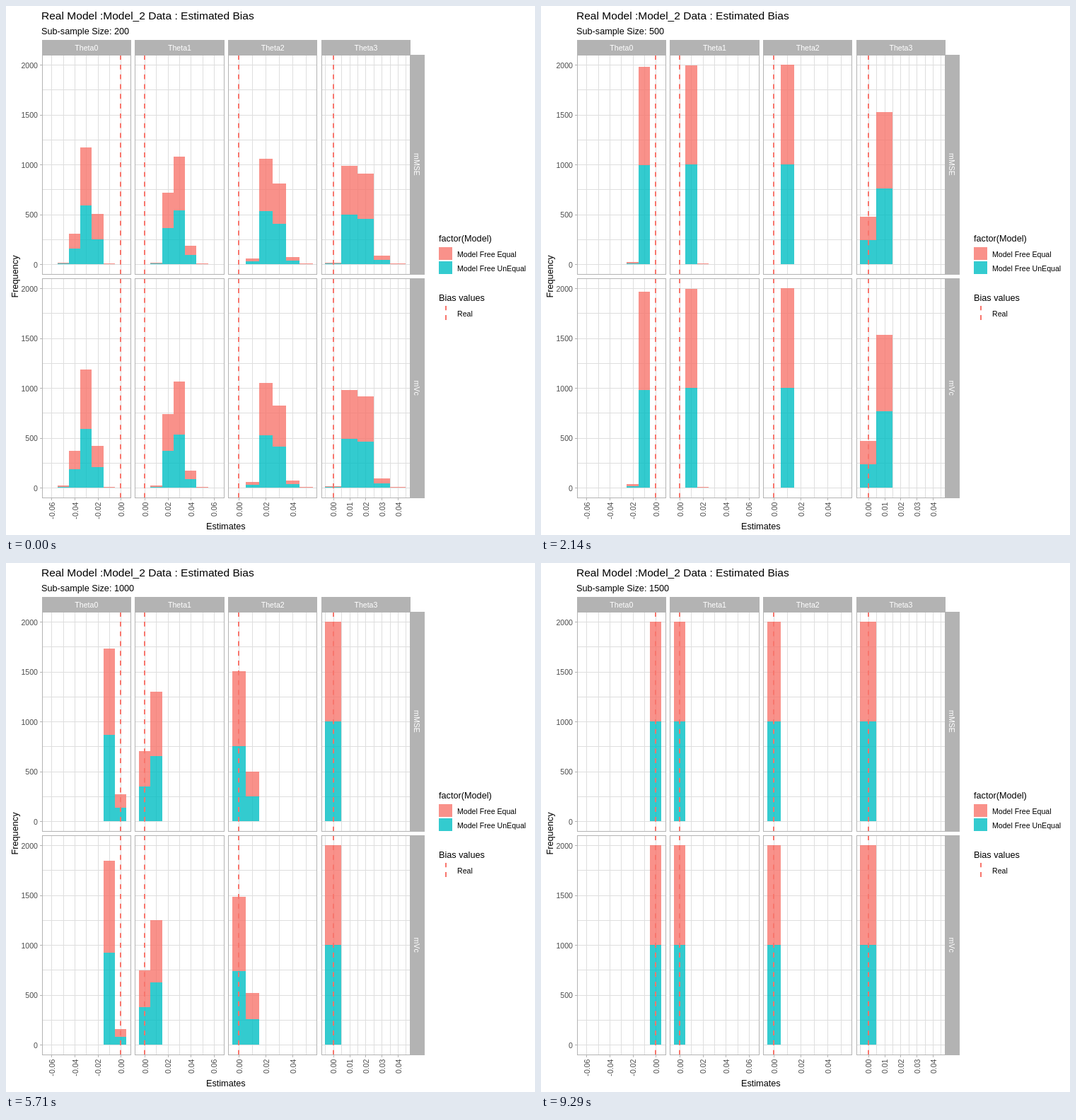
An HTML page with a canvas for the animation above (10000 ms loop, 748x748 px).

```html
<!DOCTYPE html>
<html lang="en">
<head>
<meta charset="utf-8">
<title>Estimated Bias</title>
<style>
  html, body { margin: 0; width: 100%; height: 100%; overflow: hidden; background: #fff; }
  canvas { display: block; width: 748px; height: 748px; }
</style>
</head>
<body>
<canvas id="stage" width="748" height="748"></canvas>
<script>
const ctx = document.getElementById('stage').getContext('2d');
const snap = Math.floor;
const LOOP = 10000, STEPS = 14;
const SALMON = '#F8766D', TEAL = '#00BFC4', GREY = '#B3B3B3', GRID = '#DEDEDE', AXIS = '#4D4D4D';
const SMALL = 10.6, MEDIUM = 12.7, LARGE = 15.55;
const PANEL_W = 125.5, PANEL_GAP = 6.2;

// Facet columns, in bins of 0.01. The square root of the bias is normal;
// mean (one per row) and spread are given for a sub-sample of 200.
const columns = [
  { first: -6, last: 0, sign: -1, label: 2, grid: 1, mean: [1.697, 1.722], spread: 0.175 },
  { first: 0, last: 6, sign: 1, label: 2, grid: 1, mean: [1.64, 1.635], spread: 0.175 },
  { first: 0, last: 5, sign: 1, label: 2, grid: 1, mean: [1.555, 1.558], spread: 0.175 },
  { first: 0, last: 4, sign: 1, label: 1, grid: 0.5, mean: [1.225, 1.227], spread: 0.21 }
].map((c, i) => {
  const left = 51.05 + i * (PANEL_W + PANEL_GAP);
  const bins = c.last - c.first + 1;
  const step = PANEL_W / 1.1 / bins;
  const x = bin => left + PANEL_W / 22 + (bin - c.first + 0.5) * step;
  return { ...c, bins, name: 'Theta' + i, left, right: left + PANEL_W, x };
});
const rows = [
  { name: 'mMSE', top: 69.4, bottom: 379.6, zero: 365.5 },
  { name: 'mVc', top: 385.5, bottom: 695.7, zero: 681.6 }
].map(r => ({ ...r, y: count => r.zero - count * 0.141 }));

const normalCdf = z => 1 / (1 + Math.exp(-1.5976 * z - 0.07056 * z ** 3));

// Expected counts per bin, moving away from zero.
function histogram(col, r, size) {
  const mean = col.mean[r] * (200 / size) ** 0.511;
  const spread = col.spread * 200 / size;
  const below = edge => edge < 0 ? 0 : normalCdf((Math.sqrt(edge) - mean) / spread);
  return Array.from({ length: col.bins },
    (_, k) => Math.round(2000 * (below(k + 0.5) - below(k - 0.5))));
}

function fill(x0, y0, x1, y1, color) {
  ctx.fillStyle = color;
  ctx.fillRect(x0, y0, x1 - x0, y1 - y0);
}
const hLine = (x0, x1, y, color) => fill(x0, snap(y), x1, snap(y) + 1, color);
const vLine = (x, y0, y1, color) => fill(snap(x), y0, snap(x) + 1, y1, color);

function text(str, x, y, size, color = '#000', align = 'left', turn = 0) {
  ctx.save();
  ctx.translate(x, y);
  ctx.rotate(turn * Math.PI / 2);
  ctx.font = `${size}px "Liberation Sans", Arial, sans-serif`;
  ctx.textAlign = align;
  ctx.fillStyle = color;
  ctx.fillText(str, 0, 0);
  ctx.restore();
}

function dashes(x, bottom, top) {
  ctx.save();
  ctx.strokeStyle = SALMON;
  ctx.lineWidth = 2;
  ctx.setLineDash([6.9, 6.9]);
  ctx.beginPath();
  ctx.moveTo(snap(x), bottom);
  ctx.lineTo(snap(x), top);
  ctx.stroke();
  ctx.restore();
}

function gridLines(col, row) {
  const left = snap(col.left), right = snap(col.right) + 1;
  const top = snap(row.top), bottom = snap(row.bottom) + 1;
  for (let n = 0; n <= 2000; n += 250) hLine(left, right, row.y(n), GRID);
  for (let b = col.first - 0.5; b <= col.last + 0.5; b += 0.5) {
    if (Number.isInteger(b / col.grid)) vLine(col.x(b), top, bottom, GRID);
  }
}

function border(col, row) {
  const left = snap(col.left), top = snap(row.top);
  ctx.strokeStyle = GREY;
  ctx.lineWidth = 1;
  ctx.strokeRect(left + 0.5, top + 0.5, snap(col.right) - left, snap(row.bottom) - top);
}

function bars(col, row, counts) {
  ctx.globalAlpha = 0.8;
  counts.forEach((count, k) => {
    if (!count) return;
    const bin = k * col.sign;
    const x0 = snap(col.x(bin - 0.5)), x1 = snap(col.x(bin + 0.5));
    const base = snap(row.zero), middle = snap(row.y(count / 2)), top = snap(row.y(count));
    fill(x0, Math.min(top, base - 1), x1, middle, SALMON);
    fill(x0, middle, x1, base, TEAL);
  });
  ctx.globalAlpha = 1;
}

function axes() {
  for (const row of rows) {
    for (let n = 0; n <= 2000; n += 500) {
      hLine(48, 51, row.y(n), GREY);
      text(n, 45, row.y(n) + 4.3, SMALL, AXIS, 'right');
    }
    fill(snap(columns[3].right), snap(row.top), 592, snap(row.bottom) + 1, GREY);
    text(row.name, 576.5, (row.top + row.bottom) / 2 - 0.5, SMALL, '#fff', 'center', 1);
  }
  for (const col of columns) {
    fill(snap(col.left), 48, snap(col.right) + 1, 69, GREY);
    text(col.name, (col.left + col.right) / 2, 63, SMALL, '#fff', 'center');
    for (let b = col.first; b <= col.last; b += col.label) {
      vLine(col.x(b), 696, 699, GREY);
      text((b / 100).toFixed(2), col.x(b) + 4, 701.5, SMALL, AXIS, 'right', -1);
    }
  }
  text('Estimates', 310.8, 740, MEDIUM, '#000', 'center');
  text('Frequency', 17, 382.5, MEDIUM, '#000', 'center', -1);
}

function legend() {
  text('factor(Model)', 612, 333, MEDIUM);
  ctx.globalAlpha = 0.8;
  fill(612, 341, 631, 359, SALMON);
  fill(612, 361, 631, 379, TEAL);
  ctx.globalAlpha = 1;
  text('Model Free Equal', 638, 355, SMALL);
  text('Model Free UnEqual', 638, 375, SMALL);
  text('Bias values', 612, 417, MEDIUM);
  dashes(622, 444, 424);
  text('Real', 638, 439, SMALL);
}

function draw(size) {
  fill(0, 0, 748, 748, '#fff');
  text('Real Model :Model_2 Data : Estimated Bias', 50, 19, LARGE);
  text('Sub-sample Size: ' + size, 50, 40, MEDIUM);
  rows.forEach((row, r) => columns.forEach(col => {
    gridLines(col, row);
    bars(col, row, histogram(col, r, size));
    dashes(col.x(0), row.bottom, row.top);
    border(col, row);
  }));
  axes();
  legend();
}

// Steps start on a clock of 10 ms ticks.
const startOf = i => Math.round(i * LOOP / STEPS / 10) * 10;
const origin = performance.now();
let shown = -1;

function tick() {
  const t = (performance.now() - origin) % LOOP;
  let index = 0;
  while (index < STEPS - 1 && startOf(index + 1) <= t) index++;
  if (index !== shown) {
    shown = index;
    draw(200 + 100 * index);
  }
  requestAnimationFrame(tick);
}
tick();
</script>
</body>
</html>
```
